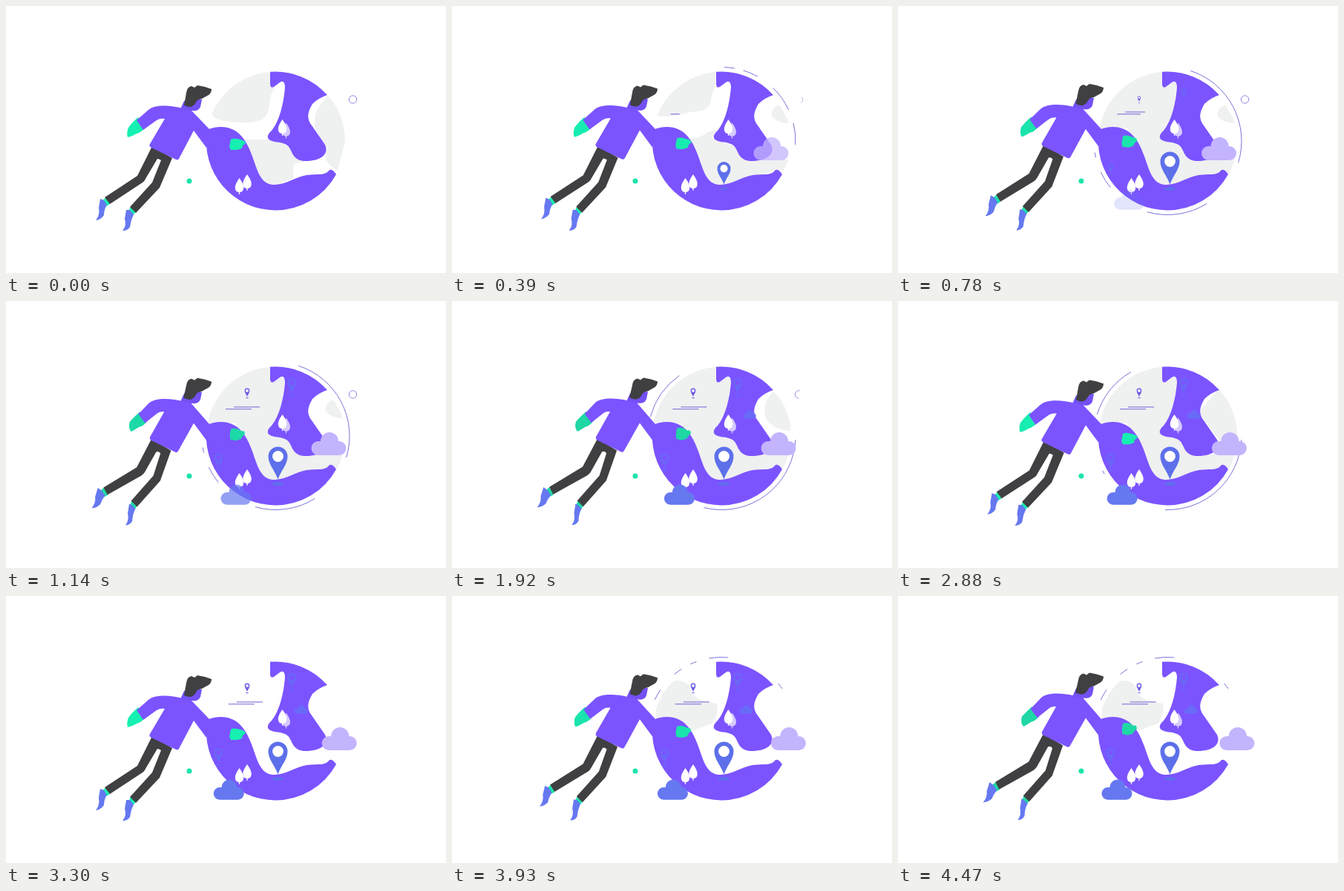
An HTML page with a canvas that plays this animation: 593x360 px, repeating every 4.5 s.

```html
<!DOCTYPE html>
<html>
<head>
<meta charset="utf-8">
<style>
html, body { margin: 0; width: 100%; height: 100%; overflow: hidden; background: #fff }
canvas { display: block }
</style>
</head>
<body>
<canvas width="593" height="360"></canvas>
<script>
const ctx = document.querySelector('canvas').getContext('2d');
const LOOP = 4500, BOB = 3200;
const PURPLE = '#7b54ff', GREY = '#eff0f0', DARK = '#404042', BLUE = '#6678f0', PIN = '#5d70ea';

const clamp = v => Math.max(0, Math.min(1, v));
const ramp = (t, from, to) => clamp((t - from) / (to - from));
const ease = k => k * k * (3 - 2 * k);

// Each limb or garment: colour, pose at the bottom and at the top of the bob.
const body = [
  ['green',
    'M134 259L140 267L135 270L130 262Z M168 271L175 278L171 282L165 277Z',
    'M131 250L137 260L132 263L127 254Z M170 269L177 276L174 281L167 276Z'],
  [BLUE,
    'M127 260L132 262L136 268Q132 275 132 282Q128 288 121 289Q127 282 125 272Z',
    'M123 250L128 254L133 261Q128 267 126 272Q121 277 114 277Q120 270 119 262Z'],
  [BLUE,
    'M162 275L167 275L172 281Q168 289 167 298Q164 303 157 303Q163 296 160 287Z',
    'M167 273L170 275L175 280Q171 287 171 296Q168 302 162 302Q167 295 165 286Z'],
  [DARK,
    'M197 189L177 229L133 258L140 267L184 238Q187 236 188 233L204 206Q206 206 209 208L197 238L167 271L175 279L207 245L224 205Z',
    'M196 185L176 223L131 250L136 260L182 235Q185 233 187 230L202 203Q206 201 208 205L199 235L169 269L177 277L208 242L222 201Z'],
  ['#7350f4',
    'M240 128L235 139L250 146L250 141Q259 143 262 136L264 126L250 123Z',
    'M240 124L235 135L250 142L250 137Q259 139 262 132L264 122L250 119Z'],
  ['green',
    'M178 150L187 165Q181 171 176 172Q170 176 164 177Q162 171 165 164Q169 158 178 150Z',
    'M181 149L190 163Q184 169 181 169Q176 172 170 176Q165 172 167 163Q172 157 181 149Z'],
  [PURPLE,
    'M176 154L192 140C200 133 220 133 238 138L250 141L274 166L270 191L253 168L233 206Q232 208 229 207L196 191Q192 189 194 186L214 152Q208 151 203 154L185 167Z',
    'M179 152L193 137C201 130 219 130 237 134L250 138L274 166L270 187L253 164L232 201Q231 204 228 203L197 188Q193 186 194 183L213 149Q208 148 204 151L188 164Z'],
  [DARK,
    'M240 134L243 117Q244 109 250 108L254 110L258 107L268 109L277 112Q277 117 273 120L264 125Q257 126 256 130Q252 137 246 136Z',
    'M239 130L243 113Q244 105 250 104L254 106L258 103L268 105L277 108Q277 113 273 116L264 121Q257 122 256 126Q252 133 246 132Z'],
  ['green',
    'M303 180Q306 178 311 179L316 180L321 182L323 185L319 188L318 192L312 194L303 194L301 190Z',
    'M303 171Q306 169 313 171L317 174L321 174L322 178L319 181L316 185L309 187L302 185L302 178Z']
];

const land = new Path2D(
  'M356 88.800A93.5 93.5 0 0 1 433 120Q421 124 413 132C406 144 405 152 412 161L430 187' +
  'C436 200 424 209 404 209C388 209 386 198 383 193C380 185 370 184 362 183' +
  'C351 181 350 175 358 168C369 154 374 132 376 110C376 102 373 100 369 103L361 109C357 111 356 108 356 104Z' +
  'M271 167C285 161 302 161 314 172C326 183 331 200 337 217C343 234 350 241 362 241' +
  'C380 240 388 231 405 228C420 226 430 229 435 222C438 219 442 222 445 227' +
  'A93.5 93.5 0 0 1 363.5 275.5A93.5 93.5 0 0 1 271 167Z');

const west = 'M380 80L370 150L383 190L405 207L470 207L440 230L360 250L320 210L310 165L260 165L260 80Z';
const islet = 'M430 147Q433 134 442 134L455 158Q438 159 430 147Z';

// Pale seas and orbit arcs (degrees) shown until the given time.
const phases = [
  [200, 'M356 85L356 108L362 110Q355 120 355 135Q352 152 340 155Q320 160 290 154Q278 151 279 147L262 140L300 85Z' +
    'M322 180L365 180L385 192Q388 205 404 209L388 213Q386 222 388 232L355 245L335 220Z' +
    'M433 121L465 150L447 222L437 215Q427 207 433 192L416 165Q415 150 419 140Z', []],
  [700, 'M356 85L355 108Q349 120 348 132Q345 142 320 143Q302 149 283 149L262 145L300 85Z' +
    'M318 180Q335 178 345 170L358 166L350 178L383 190L405 207L454 207L447 222L435 222L350 250Z' + islet,
    [-88, -80, -73, -61, -46, -25, -14, 3]],
  [1500, west + islet, [-72, 17, 58, 106, 141, 155, 167, 171]],
  [2200, west + 'M433 122Q415 140 424 160Q435 174 456 175L460 150Z', [3, 104, 195, 235]],
  [2900, west + 'M433 118L405 150L435 190L430 207L470 207L470 150Z', [3, 92, 149, 152, 197, 240]],
  [3900, '', []],
  [LOOP, 'M275 165L275 145Q285 113 305 114Q322 116 322 130Q330 142 357 145Q360 160 350 172L325 181Z',
    [205, 214, 230, 237, 245, 250, 260, 275, 320, 325]]
].map(([until, sea, arcs]) => ({ until, sea: new Path2D(sea), arcs }));

const cloudShape = new Path2D('M10 31A9.5 9.5 0 0 1 10 12L13 12A12 12 0 0 1 37 12L38 12A9.5 9.5 0 0 1 38 31Z');
const pinShape = new Path2D('M0 0C-4 -12 -13 -20 -13 -31A13 13 0 0 1 13 -31C13 -20 4 -12 0 0Z');
const treeShape = new Path2D('M0 -10Q5 -3 5 1Q5 6 .6 6.5L.6 9L-.6 9L-.6 6.5Q-5 6 -5 1Q-5 -3 0 -10Z');

function blend(a, b, k) {
  const target = b.match(/\d+/g);
  let i = 0;
  return new Path2D(a.replace(/\d+/g, n => +n + (target[i++] - n) * k));
}

function place(x, y, scale, alpha, draw) {
  ctx.save();
  ctx.translate(x, y);
  ctx.scale(scale, scale);
  ctx.globalAlpha = alpha;
  draw();
  ctx.restore();
}

function fill(path, color) {
  ctx.fillStyle = color;
  ctx.fill(path);
}

function ellipse(x, y, rx, ry, color) {
  ctx.beginPath();
  ctx.ellipse(x, y, rx, ry, 0, 0, 7);
  ctx.fillStyle = color;
  ctx.fill();
}

function arc(x, y, r, from, to, color) {
  ctx.beginPath();
  ctx.arc(x, y, r, from * Math.PI / 180, to * Math.PI / 180);
  ctx.strokeStyle = color;
  ctx.stroke();
}

const shape = (path, x, y, scale, color, alpha = 1) =>
  place(x, y, scale, alpha, () => fill(path, color));

function pin(x, y, scale, grow, color, hole) {
  if (!grow) return;
  place(x, y, scale, grow, () => ellipse(0, 6, 8 * grow, 2.2, color));
  place(x, y, scale * grow, 1, () => {
    fill(pinShape, color);
    ellipse(0, -31, 7.4, 7.4, hole);
  });
}

function globe(t) {
  const { sea, arcs } = phases.find(p => t < p.until);
  ctx.save();
  ctx.beginPath();
  ctx.arc(363.5, 182, 93.5, 0, 7);
  ctx.clip();
  fill(sea, GREY);
  ctx.restore();
  fill(land, PURPLE);
  for (let i = 0; i < arcs.length; i += 2)
    arc(363.5, 182, 99.5, arcs[i], arcs[i + 1], '#7c72d8');
}

function scenery(t) {
  const s = t / 1000;
  shape(treeShape, 377.5, 168.5, 1.1, '#d5caff');
  shape(treeShape, 372.5, 164.5, 1.15, '#fff');
  shape(treeShape, 314.5, 243.5, 1.15, '#fff');
  shape(treeShape, 325, 238.5, 1.15, '#fff');

  const small = ease(ramp(t, 450, 1000));
  pin(366.5, 240.5, 1, ease(ramp(t, 0, 620)), PIN, '#fff');
  pin(385, 124, .46, small, '#6b66f8', PURPLE);
  pin(286.5, 225, .45, small, '#6b66f8', PURPLE);
  pin(325, 129, .26, small, '#6c5fe4', '#fff');

  ctx.fillStyle = '#7a70d8';
  ctx.fillRect(305 + 1.75 * s, 142.4, 35 * ramp(t, 390, 900), 1.1);
  ctx.fillRect(294 + 1.75 * s, 145.2, 35 * ramp(t, 150, 850), 1.1);

  shape(cloudShape, 403.4 + 6.6 * s, 177, 1, '#c4b4fd', ramp(t, 0, 520));
  shape(cloudShape, 396.5 - 2.4 * s, 147, .375, '#6a6af8', ramp(t, 1150, 1700));
  shape(cloudShape, 294.1 - 4.5 * s, 247.5, .875, BLUE, ramp(t, 650, 1350));

  ellipse(247, 236, 3.5, 3.5, '#1de3ab');
  if (t < 200 || t > 700 && t < 1500) arc(467.5, 126, 5.2, 0, 360, '#9188e6');
  else if (t < 700) arc(467.5, 126, 5.2, -40, 60, '#b5b0e6');
  else if (t < 2200) arc(467.5, 126, 5.2, 90, 290, '#9c95e0');
}

function person(t) {
  const k = (1 - Math.cos(t / BOB * 2 * Math.PI)) / 2;
  const green = `rgb(${22 + 9 * k},${240 - 28 * k},${178 - 14 * k})`;
  for (const [color, low, high] of body)
    fill(blend(low, high, k), color === 'green' ? green : color);
}

function frame() {
  const t = performance.now() % LOOP;
  ctx.fillStyle = '#fff';
  ctx.fillRect(0, 0, 593, 360);
  globe(t);
  scenery(t);
  person(t);
  requestAnimationFrame(frame);
}
frame();
</script>
</body>
</html>
```
